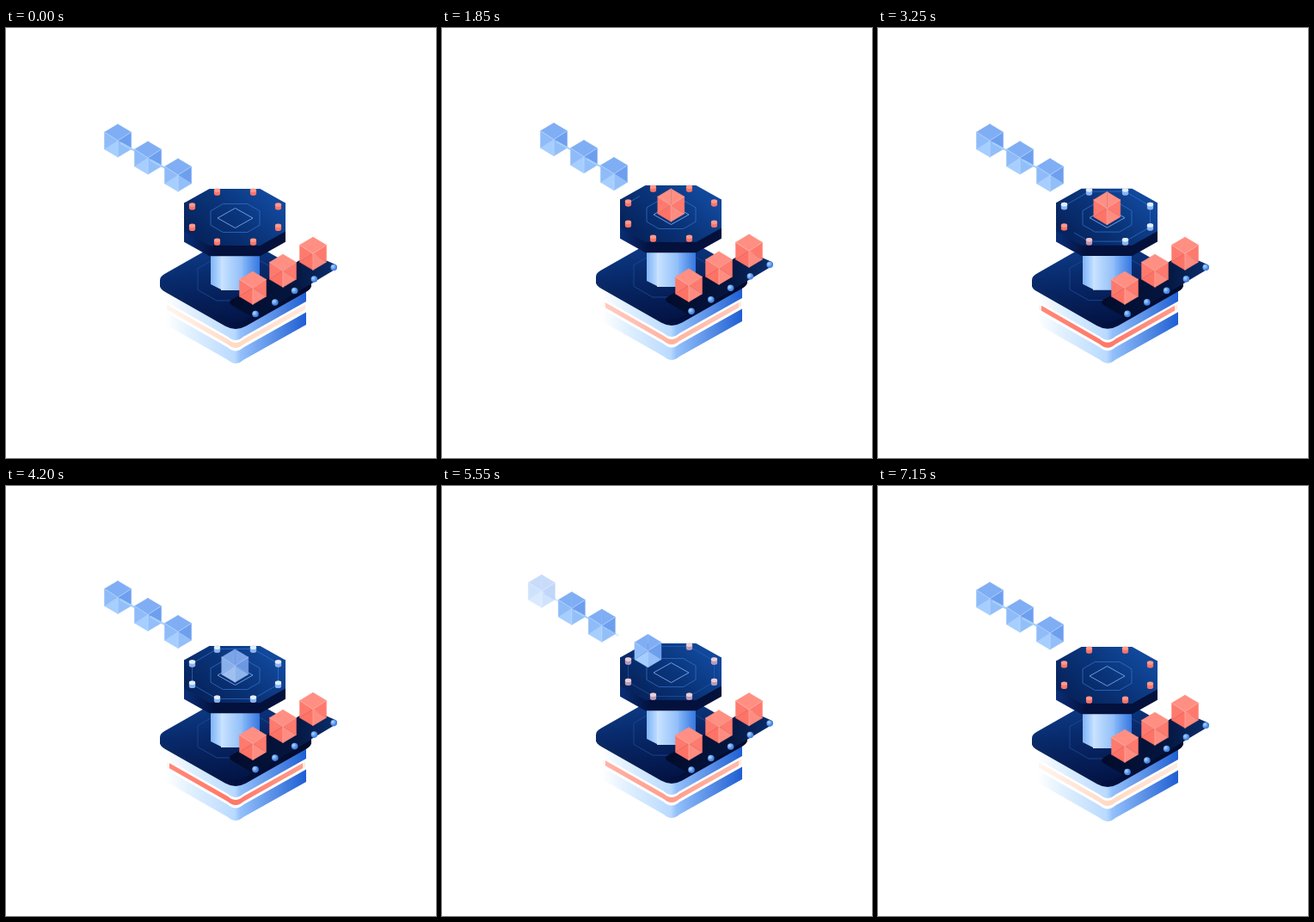
An HTML page that plays this animation: 500 px wide and 500 px high, repeating every 7200 ms.

```html
<!DOCTYPE html>
<html lang="en">
<head>
<meta charset="utf-8">
<title>Block factory</title>
<style>
html, body { margin: 0; width: 100%; height: 100%; overflow: hidden; background: #fff; }
svg { display: block; width: 100vw; height: 100vh; }
</style>
</head>
<body>
<svg id="stage" viewBox="0 0 500 500">
  <defs>
    <linearGradient id="plateFill" x1="0.35" y1="0" x2="0.6" y2="1">
      <stop offset="0" stop-color="#0e4190"/><stop offset=".45" stop-color="#08296a"/><stop offset="1" stop-color="#031344"/>
    </linearGradient>
    <linearGradient id="plateSide">
      <stop offset="0" stop-color="#0a2b69"/><stop offset=".5" stop-color="#031140"/><stop offset="1" stop-color="#020b2b"/>
    </linearGradient>
    <linearGradient id="discFill" x1="0.1" y1="0.75" x2="0.9" y2="0.25">
      <stop offset="0" stop-color="#06245e"/><stop offset=".5" stop-color="#0a3479"/><stop offset="1" stop-color="#11489c"/>
    </linearGradient>
    <linearGradient id="discSide">
      <stop offset="0" stop-color="#0a2e78"/><stop offset=".3" stop-color="#03113d"/><stop offset="1" stop-color="#03113b"/>
    </linearGradient>
    <linearGradient id="beltFill">
      <stop offset="0" stop-color="#020b2b"/><stop offset=".6" stop-color="#04163f"/><stop offset="1" stop-color="#0b2f6e"/>
    </linearGradient>
    <linearGradient id="layerFill">
      <stop offset="0" stop-color="#fff"/><stop offset=".18" stop-color="#e0f0fe"/><stop offset=".49" stop-color="#b9daff"/>
      <stop offset=".53" stop-color="#94c1fb"/><stop offset="1" stop-color="#1f5fd3"/>
    </linearGradient>
    <linearGradient id="peachFill">
      <stop offset="0" stop-color="#fff6f0"/><stop offset=".5" stop-color="#ffd9c2"/><stop offset="1" stop-color="#ffeadd"/>
    </linearGradient>
    <linearGradient id="coralFill">
      <stop offset="0" stop-color="#ff8878"/><stop offset=".5" stop-color="#ff7768"/><stop offset="1" stop-color="#ff9c8c"/>
    </linearGradient>
    <linearGradient id="paleFace">
      <stop offset="0" stop-color="#7fb3f7"/><stop offset="1" stop-color="#bcdcff"/>
    </linearGradient>
    <linearGradient id="midFace">
      <stop offset="0" stop-color="#cbe4ff"/><stop offset="1" stop-color="#8fbdf9"/>
    </linearGradient>
    <linearGradient id="deepFace">
      <stop offset="0" stop-color="#86b7f8"/><stop offset="1" stop-color="#3577e0"/>
    </linearGradient>
    <radialGradient id="rollerFill" cx=".35" cy=".35">
      <stop offset="0" stop-color="#b5d8ff"/><stop offset="1" stop-color="#4586e6"/>
    </radialGradient>
  </defs>
  <g id="chain"></g>
  <g id="base"></g>
  <g id="belt"></g>
  <g id="disc"></g>
  <g id="boxes"></g>
</svg>
<script>
const LOOP = 7200;
const STEP = [35, -20];
const CENTER = [266.3, 210];
const byId = id => document.getElementById(id);

function add(parent, tag, attrs) {
  const node = document.createElementNS('http://www.w3.org/2000/svg', tag);
  for (const key in attrs) node.setAttribute(key, attrs[key]);
  parent.appendChild(node);
  return node;
}
const poly = (parent, points, attrs) => add(parent, 'polygon', { points: points.join(' '), ...attrs });
const line = (stroke, width = 0.8) => ({ fill: 'none', stroke, 'stroke-width': width });

// Diamond with softened corners
function roundDiamond(cx, cy, w, h, cut) {
  const corners = [[cx - w, cy], [cx, cy - h], [cx + w, cy], [cx, cy + h]];
  const toward = (a, b) => [a[0] + (b[0] - a[0]) * cut, a[1] + (b[1] - a[1]) * cut];
  return corners.map((c, i) =>
    `${i ? 'L' : 'M'}${toward(c, corners[(i + 3) % 4])}Q${c} ${toward(c, corners[(i + 1) % 4])}`).join('') + 'Z';
}

// V-shaped band around the front of the base
function band(top, thick, fill, inset = 0) {
  const l = 186 + inset, r = 349 - inset, slope = 45;
  const edge = (y, from, to) => `${from},${y + inset * 0.55} L${from < to ? 258 : 276},${y + slope - 4}`
    + ` Q267,${y + slope + 4} ${from < to ? 276 : 258},${y + slope - 4} L${to},${y + inset * 0.55}`;
  return add(byId('base'), 'path', { d: `M${edge(top, l, r)} L${edge(top + thick, r, l)}Z`, fill });
}

function octagon(cx, cy, w, h, flatX = 0.5, flatY = 0.5) {
  const a = w * flatX, b = h * flatY;
  return [[-w, -b], [-a, -h], [a, -h], [w, -b], [w, b], [a, h], [-a, h], [-w, b]]
    .map(([x, y]) => [cx + x, cy + y]);
}

const RED = ['#ff8f83', '#ff7a6e', '#ff8c80', '#ff7367', '#ff7a6e', '#ff8f83', '#ffb3a8'];
const BLUE = ['#80aef4', '#6e9fef', '#93bff9', '#a6ceff', '#8fbbf8', '#80aef4', '#bcdaff'];

function cube(parent, colors) {
  const g = add(parent, 'g', {});
  const rim = [[0, -19.3], [15.6, -10], [15.6, 10], [0, 19.3], [-15.6, 10], [-15.6, -10]];
  rim.forEach((p, i) => poly(g, [[0, 0], p, rim[(i + 1) % 6]],
    { fill: colors[i], stroke: colors[i], 'stroke-width': 0.3 }));
  add(g, 'path', { d: `M0,0L${rim[1]}M0,0L${rim[3]}M0,0L${rim[5]}`, ...line(colors[6], 0.7) });
  return g;
}
function place(node, x, y, opacity = 1) {
  node.setAttribute('transform', `translate(${x.toFixed(2)} ${y.toFixed(2)})`);
  node.setAttribute('opacity', opacity.toFixed(3));
}

// Base
band(296, 22, 'url(#layerFill)');
band(321, 6, 'url(#peachFill)', 1);
const coral = band(321, 6, 'url(#coralFill)', 4);
band(330.5, 14.5, 'url(#layerFill)');
const base = byId('base');
add(base, 'path', { d: roundDiamond(267, 300, 94, 53.5, 0.13), fill: 'url(#plateSide)' });
add(base, 'path', { d: 'M179,293V301H355V293Z', fill: 'url(#plateSide)' });
add(base, 'path', { d: roundDiamond(267, 292.5, 94, 53.5, 0.13), fill: 'url(#plateFill)' });
poly(base, octagon(267, 292, 44, 25), line('#1d4c98', 0.8));
poly(base, [[238, 258], [250, 258], [250, 304], [238, 298]], { fill: 'url(#paleFace)' });
poly(base, [[250, 258], [275, 258], [275, 305], [250, 305]], { fill: 'url(#midFace)' });
poly(base, [[275, 258], [295, 258], [295, 298], [282, 305], [275, 305]], { fill: 'url(#deepFace)' });

// Conveyor
const belt = byId('belt');
add(belt, 'path', { d: 'M262,316L352,264Q355,262 358,264L383,275Q386,277 384,280L290,336Q287,337 284,335L262,322Q258,319 262,316Z', fill: 'url(#beltFill)' });
for (let i = 0; i < 5; i++)
  add(belt, 'circle', { cx: 290 + 22.8 * i, cy: 332.5 - 13.5 * i, r: 3.8, fill: 'url(#rollerFill)' });

// Disc
const disc = byId('disc');
const discTop = octagon(266, 220, 59, 33);
poly(disc, [discTop[0], discTop[3], ...discTop.slice(4).map(([x, y]) => [x, y + 12.3])], { fill: 'url(#discSide)' });
poly(disc, discTop, { fill: 'url(#discFill)' });
const PINS = octagon(266.5, 219.5, 50, 29, 0.42, 0.42);
const circuit = poly(disc, PINS, { ...line('#3479d6', 0.8), pathLength: 1 });
poly(disc, octagon(266.5, 221, 28.5, 16.5), line('#2f6fc9', 0.8));
poly(disc, [[246, 221], [266.5, 209.5], [287, 221], [266.5, 232.5]], line('#72aaf0', 0.9));

function pin([x, y], side, cap) {
  const g = add(disc, 'g', {});
  add(g, 'path', { d: `M${x - 3.6},${y - 2}V${y + 2}A3.6 2.3 0 0 0 ${x + 3.6},${y + 2}V${y - 2}Z`, fill: side });
  add(g, 'ellipse', { cx: x, cy: y - 1.8, rx: 3.6, ry: 2.3, fill: cap });
  return g;
}
const pins = PINS.map(p => {
  pin(p, '#ff7468', '#ff9a8d');
  return pin(p, '#82b6f8', '#e0f0ff');
});

// Moving cubes
const boxes = byId('boxes');
const queue = [2, 1, 0].map(() => cube(boxes, RED));
const rider = cube(boxes, RED);
const minted = cube(boxes, BLUE);

const chain = byId('chain');
const links = [0, 1, 2].map(() => ({
  box: cube(chain, BLUE),
  joint: add(chain, 'path', { d: 'M3,2.5L19.5,11.5', ...line('#a6d2fc', 2) })
}));

const clamp = v => Math.min(1, Math.max(0, v));
const span = (t, a, b) => clamp((t - a) / (b - a));
const ease = p => (1 - Math.cos(Math.PI * p)) / 2;
const mix = (a, b, p) => a + (b - a) * p;

// Two rises of the given height, with turning points at the given times
function doubleBob(t, height, peak1, dip, peak2, rest) {
  const rise = (a, top, b) => t < top ? ease(span(t, a, top)) : 1 - ease(span(t, top, b));
  return -height * (t < dip ? rise(0, peak1, dip) : rise(dip, peak2, rest));
}

function draw(t) {
  const bob = -2 * (1 - Math.cos(t / 3600 * 2 * Math.PI));
  const beltBob = doubleBob(t, 4, 1300, 3100, 4800, 6600);
  const chainBob = doubleBob(t, 2, 1200, 3000, 4800, 6000);
  place(base, 0, bob);
  place(disc, 0, bob);
  place(belt, 0, beltBob);

  // The line of cubes advances while the next one fades in behind it
  const feed = ease(span(t, 100, 1500));
  queue.forEach((node, i) => {
    const at = i - 1 + feed;
    place(node, 287 + STEP[0] * at, 302.3 + STEP[1] * at + beltBob, i === 0 ? feed : 1);
  });

  const hop = ease(span(t, 150, 1650));
  const turn = span(t, 3300, 4300);
  const leave = ease(span(t, 5200, 6000));
  place(rider, mix(357, CENTER[0], hop),
    mix(262.3 + beltBob, CENTER[1] + bob, hop) - 30 * hop * (1 - hop), 1 - span(t, 4000, 4300));
  place(minted, mix(CENTER[0], 200, leave),
    mix(CENTER[1] + bob, 171 + chainBob, leave), t < 6000 ? turn : 0);

  const reset = 1 - span(t, 5300, 5950);
  pins.forEach((node, i) => {
    const start = 1950 + 200 * i;
    node.setAttribute('opacity', span(t, start, start + 200) * reset);
  });
  const drawn = span(t, 1750, 3500);
  circuit.setAttribute('stroke-dasharray', `${drawn} 2`);
  circuit.setAttribute('opacity', drawn > 0 ? reset * 0.8 : 0);
  coral.setAttribute('opacity', span(t, 1500, 2400) * reset);

  // The chain moves up one place as the new cube joins it
  const shift = t < 6000 ? leave : 0;
  links.forEach(({ box, joint }, i) => {
    const x = 130 + 35 * (i - shift), y = 131 + 20 * (i - shift) + chainBob;
    const shown = i === 0 ? clamp(1 - shift / 0.7) : 1;
    place(box, x, y, shown);
    place(joint, x, y, i === 2 ? (t < 6000 ? shift : 0) : shown);
  });
}

const begin = performance.now();
function tick() {
  draw((performance.now() - begin) % LOOP);
  requestAnimationFrame(tick);
}
draw(0);
requestAnimationFrame(tick);
</script>
</body>
</html>
```
